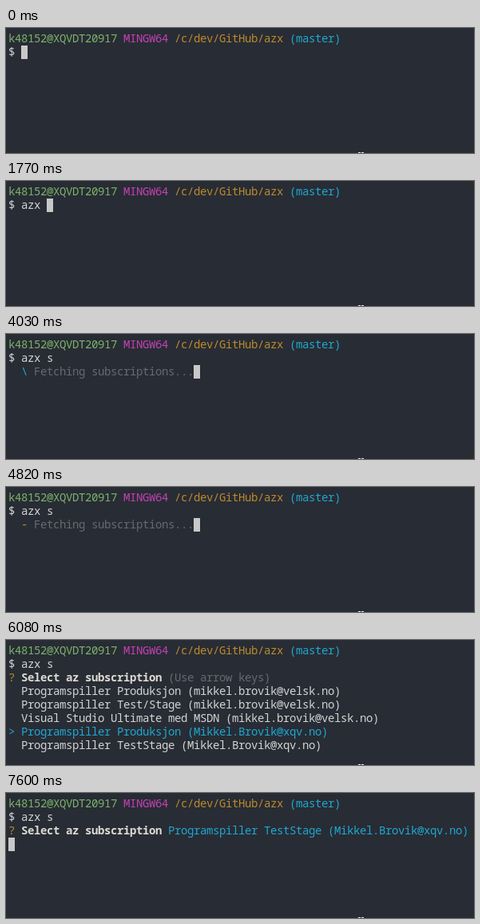
An HTML page for the animation above (8000 ms loop, 586x157 px).

```html
<!DOCTYPE html>
<html lang="en">
<head>
<meta charset="utf-8">
<title>Terminal</title>
<style>
  html, body { margin: 0; width: 100%; height: 100%; overflow: hidden; background: #282c34; }
  svg { display: block; }
  text {
    font: 14px "Noto Sans Mono", "DejaVu Sans Mono", monospace;
    letter-spacing: -0.4px;
    white-space: pre;
    font-variant-ligatures: none;
  }
</style>
</head>
<body>
<svg width="586" height="157" viewBox="0 0 586 157" shape-rendering="crispEdges">
  <g id="screen"></g>
  <rect id="cursor" width="8" height="17" fill="#c8c8c8"/>
  <path d="M441 156h3v1h-3zM445 156h3v1h-3z" fill="#f0f0f0"/>
</svg>
<script>
const LOOP = 8000, LEFT = 3, TOP = 5, CELL = 8, ROW = 17, BASE = 13;
const C = {
  text: '#d4d4d4', bold: '#dcdad4', dim: '#666a71', green: '#7bb36c',
  magenta: '#c640b6', yellow: '#bb8a2d', cyan: '#1fa8d2', blue: '#2f94d6'
};
const SVG = 'http://www.w3.org/2000/svg';
const screen = document.getElementById('screen');
const cursor = document.getElementById('cursor');

// A line is a list of [text, colour, weight] runs.
const prompt = [
  ['k48152@XQVDT20917 ', C.green], ['MINGW64 ', C.magenta],
  ['/c/dev/GitHub/azx ', C.yellow], ['(master)', C.cyan]
];
const typed = s => [['$ ' + s, C.text]];
const question = (tail, colour) => [
  ['? ', C.yellow], ['Select az subscription ', C.bold, 700], [tail, colour]
];

const mailA = ' (mikkel.brovik@velsk.no)', mailB = ' (Mikkel.Brovik@xqv.no)';
const choices = [
  'Programspiller Produksjon' + mailA,
  'Programspiller Test/Stage' + mailA,
  'Visual Studio Ultimate med MSDN' + mailA,
  'Programspiller Produksjon' + mailB,
  'Programspiller TestStage' + mailB
];
const menu = picked => choices.map((s, i) =>
  i === picked ? [['> ' + s, C.cyan]] : [['  ' + s, C.text]]);

const scenes = [];
const add = (at, lines, caret) => scenes.push({ at, lines: [prompt, ...lines], caret });

// Typing the command
[[0, ''], [850, 'a'], [930, 'az'], [1080, 'azx'], [1770, 'azx '], [2170, 'azx s']]
  .forEach(([at, s]) => add(at, [typed(s)], [s.length + 2, 1]));
const command = typed('azx s');
add(2320, [command], [0, 2]);

// Spinner: bursts of [first, last, steps]; the glyph follows a 72 ms clock
const spin = [['|', C.blue], ['/', C.cyan], ['-', C.yellow], ['\\', C.cyan]];
const label = 'Fetching subscriptions...';
[[3250, 4030, 11], [4130, 4900, 11], [4960, 5190, 4], [5390, 5550, 3], [5710, 5990, 5]]
  .forEach(([from, to, steps]) => {
    for (let i = 0; i < steps; i++) {
      const at = Math.round((from + (to - from) * i / (steps - 1)) / 10) * 10;
      const [glyph, colour] = spin[Math.round((at - 3250) / 72) % 4];
      add(at, [command, [['  ', C.text], [glyph + ' ', colour], [label, C.dim]]],
        [label.length + 4, 2]);
    }
  });

// Choosing
add(6080, [command, question('(Use arrow keys)', C.dim), ...menu(3)]);
add(7370, [command, question('', C.text), ...menu(4)]);
add(7600, [command, question(choices[4], C.cyan)], [0, 3]);

function drawLine(runs, row) {
  const line = document.createElementNS(SVG, 'text');
  line.setAttribute('y', TOP + row * ROW + BASE);
  let col = 0;
  for (const [s, colour, weight = 500] of runs) {
    const run = document.createElementNS(SVG, 'tspan');
    // Leading blanks become an offset
    const lead = s.length - s.trimStart().length;
    run.setAttribute('x', LEFT + (col + lead) * CELL);
    run.setAttribute('fill', colour);
    run.setAttribute('font-weight', weight);
    run.textContent = s.trim();
    line.append(run);
    col += s.length;
  }
  return line;
}

function draw({ lines, caret }) {
  screen.replaceChildren(...lines.map(drawLine));
  cursor.style.display = caret ? '' : 'none';
  if (caret) {
    cursor.setAttribute('x', LEFT + caret[0] * CELL);
    cursor.setAttribute('y', TOP + caret[1] * ROW);
  }
}

let shown;
const start = performance.now();
function tick() {
  const t = (performance.now() - start) % LOOP;
  const scene = scenes.findLast(s => s.at <= t);
  if (scene !== shown) draw(shown = scene);
  requestAnimationFrame(tick);
}
tick();
</script>
</body>
</html>
```
